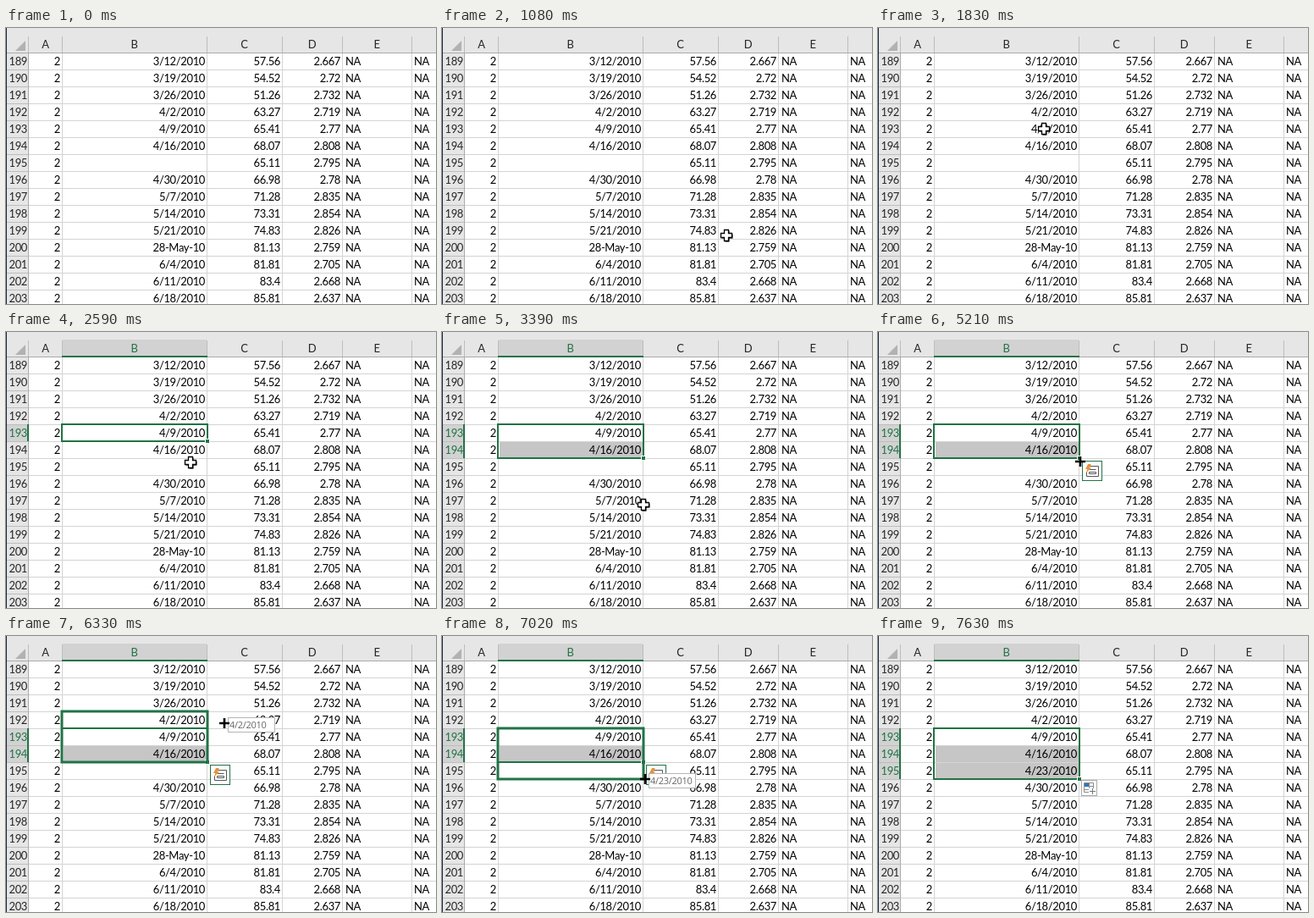
These frames come from a looping animation (508x326 px, 8000 ms). An HTML page:

```html
<!DOCTYPE html>
<html lang="en">
<head>
<meta charset="utf-8">
<title>Filling a date series</title>
<style>
  html, body { margin: 0; width: 100%; height: 100%; overflow: hidden; background: #fff; }
  svg { display: block; width: 508px; height: 326px; }
  text { font: 13px Lato, Carlito, sans-serif; letter-spacing: -.36px; fill: #000; }
  .head { fill: #262626; }
  .head.on { fill: #217346; }
  .tip { font: 11px "Open Sans", sans-serif; letter-spacing: -.3px; fill: #666; }
</style>
</head>
<body>
<svg id="stage" viewBox="0 0 508 326"></svg>
<script>
const LOOP = 8000, STEP = 70, GREEN = '#217346';
const stage = document.getElementById('stage');

function add(tag, attrs, parent = stage, content) {
  const el = document.createElementNS('http://www.w3.org/2000/svg', tag);
  for (const k in attrs) el.setAttribute(k, attrs[k]);
  if (content !== undefined) el.textContent = content;
  parent.append(el);
  return el;
}
const rect = (x, y, width, height, fill, parent) => add('rect', { x, y, width, height, fill }, parent);
const path = (d, attrs, parent) => add('path', { d, fill: 'none', ...attrs }, parent);
const label = (x, y, s, anchor = 'end', cls = '', parent) =>
  add('text', { x, y, 'text-anchor': anchor, class: cls }, parent, s);
const show = (el, on) => el.setAttribute('visibility', on ? 'visible' : 'hidden');

// Sheet
const edges = [27, 66, 237, 326, 397, 479];
const rowTop = n => 29 + 20 * (n - 189);
const dates = ['3/12/2010', '3/19/2010', '3/26/2010', '4/2/2010', '4/9/2010', '4/16/2010', '',
  '4/30/2010', '5/7/2010', '5/14/2010', '5/21/2010', '28-May-10', '6/4/2010', '6/11/2010', '6/18/2010'];
const prices = [57.56, 54.52, 51.26, 63.27, 65.41, 68.07, 65.11, 66.98, 71.28, 73.31, 74.83, 81.13, 81.81, 83.4, 85.81];
const fuel = [2.667, 2.72, 2.732, 2.719, 2.77, 2.808, 2.795, 2.78, 2.835, 2.854, 2.826, 2.759, 2.705, 2.668, 2.637];

rect(0, 0, 508, 326, '#fff');
rect(0, 0, 508, 29, '#e6e6e6');
rect(0, 29, 26, 297, '#e6e6e6');
const colOn = rect(67, 9, 170, 20, '#d2d2d2');
const shade = rect(68, 130, 169, 19, '#c6c6c6');

const rowsOn = [193, 194, 195].map(n => rect(1, rowTop(n) + 1, 25, 19, '#d2d2d2'));
for (let n = 189; n < 204; n++) {
  rect(1, rowTop(n) + 20, 25, 1, '#bdbdbd');
  rect(27, rowTop(n) + 20, 481, 1, '#d4d4d4');
}
for (const x of edges) {
  rect(x - 1 + (x > 27), 10, 1, 19, '#bdbdbd');
  if (x > 27) rect(x, 30, 1, 296, '#d4d4d4');
}
rect(1, 29, 507, 1, '#ababab');
rect(26, 29, 1, 297, '#ababab');
path('M23 15V27H11Z', { fill: '#b2b2b2' });
const colLine = rect(66, 28, 172, 2, GREEN);
const rowLine = rect(25, 109, 2, 20, GREEN);

const colHeads = ['A', 'B', 'C', 'D', 'E'].map((s, i) =>
  label((edges[i] + edges[i + 1]) / 2, 24, s, 'middle', 'head'));
const rowHeads = dates.map((d, i) => {
  const y = 44 + 20 * i;
  label(64, y, 2);
  label(235, y, d);
  label(324, y, prices[i]);
  label(395, y, fuel[i]);
  label(401, y, 'NA', 'start');
  label(482, y, 'NA', 'start');
  return label(25, y, 189 + i, 'end', 'head');
});
const filled = label(235, 164, '4/23/2010');

// Selection
const box = add('rect', { x: 66, y: 109, width: 172, fill: 'none', stroke: GREEN, 'stroke-width': 2 });
const handle = add('rect', { x: 235.5, width: 5, height: 5, fill: GREEN, stroke: '#fff' });
const drag = add('rect', { x: 66, width: 172, fill: 'none', stroke: GREEN, 'stroke-width': 3 });

// Quick analysis button
const quick = add('g', { transform: 'translate(241 152)' });
add('rect', { x: .5, y: .5, width: 23, height: 23, fill: '#fff', stroke: GREEN }, quick);
path('M9 6.5H19.5V18.5H5.5V13M9 10.5H16.5M8.5 13.5H16.5V15.5H8.5Z', { stroke: '#555' }, quick);
path('M7 4H11L8.5 8H11L4.5 15L6.5 10H4Z', { fill: '#e8913a' }, quick);

// Fill options button
const options = add('g', { transform: 'translate(240 170)' });
add('rect', { x: .5, y: .5, width: 18, height: 18, fill: '#fff', stroke: '#ababab' }, options);
path('M3.5 3.5H14.5V10M3.5 3.5V14.5H9M3.5 11.5H9M9.5 3.5V10M3.5 7.5H14.5', { stroke: '#8a8a8a' }, options);
rect(4, 4, 5, 4, '#2f74c0', options);
path('M13.5 10V17M10 13.5H17', { stroke: '#777' }, options);

// Pointer
const tip = add('g');
add('rect', { x: 4.5, y: -6.5, width: 55, height: 17, fill: '#fff', stroke: '#b5b5b5' }, tip);
const tipText = label(6, 6, '', 'start', 'tip', tip);
const shape = 'M-2.5-6.5h5v4h4v5h-4v4h-5v-4h-4v-5h4z';
const cross = add('g');
path(shape, { fill: '#000', transform: 'translate(1 1)' }, cross);
path(shape, { fill: '#fff', stroke: '#000', 'stroke-width': 1.3 }, cross);
const plus = path('M0-6V6M-6 0H6', { stroke: '#000', 'stroke-width': 2.6 });

// Time, x, y
const route = [
  [820, 426, 314], [1150, 285, 205], [1560, 201, 128], [1630, 199, 124], [1830, 196, 119],
  [2100, 196, 119], [2390, 214, 158], [2590, 218, 154], [2800, 221, 144], [3000, 221, 143],
  [3300, 234, 195], [3720, 256, 250], [3850, 255, 248], [4050, 252, 237], [4250, 251, 228],
  [4600, 251, 195], [5010, 245, 161], [5080, 240, 154], [5210, 239, 153], [5869, 239, 153],
  [5870, 238, 151], [6130, 238, 151], [6270, 258, 103], [6480, 261, 172], [6680, 240, 169],
  [7020, 240, 169], [7300, 268, 214], [7630, 324, 300]
];

function pointerAt(t) {
  let i = 0;
  while (i < route.length - 2 && t >= route[i + 1][0]) i++;
  const [t0, x0, y0] = route[i], [t1, x1, y1] = route[i + 1];
  const p = Math.min(1, Math.max(0, Math.floor((t - t0) / STEP) * STEP / (t1 - t0)));
  return [Math.round(x0 + (x1 - x0) * p), Math.round(y0 + (y1 - y0) * p)];
}

function draw(t) {
  const count = t < 1980 ? 0 : t < 3000 ? 1 : t < 7090 ? 2 : 3;
  const height = 20 * count, bottom = 109 + height;
  const [x, y] = pointerAt(t);

  for (const el of [colOn, colLine, rowLine, box, handle]) show(el, count);
  show(shade, count > 1);
  shade.setAttribute('height', Math.max(0, height - 21));
  rowLine.setAttribute('height', height);
  box.setAttribute('height', height);
  handle.setAttribute('y', bottom - 2.5);
  rowsOn.forEach((el, i) => show(el, i < count));
  colHeads[1].classList.toggle('on', count > 0);
  rowHeads.forEach((el, i) => el.classList.toggle('on', i >= 4 && i < 4 + count));
  show(filled, count > 2);
  show(quick, t >= 3500 && count < 3);
  show(options, t >= 7160);

  const dragging = t >= 6130 && t < 7090;
  const up = y < 109, down = y > 149;
  const top = up ? 89 : 109;
  drag.setAttribute('y', top);
  drag.setAttribute('height', (down ? 169 : 149) - top);
  show(drag, dragging);
  show(tip, dragging && (up || down));
  tipText.textContent = up ? '4/2/2010' : '4/23/2010';

  const visible = t >= 820 && t < 7630;
  const thin = t >= 5080 && t < 7090;
  for (const el of [tip, cross, plus]) el.setAttribute('transform', `translate(${x} ${y})`);
  show(cross, visible && !thin);
  show(plus, visible && thin);
}

rect(0, 0, 1, 326, '#1f2a44');
const start = performance.now();
function tick() {
  draw((performance.now() - start) % LOOP);
  requestAnimationFrame(tick);
}
tick();
</script>
</body>
</html>
```
